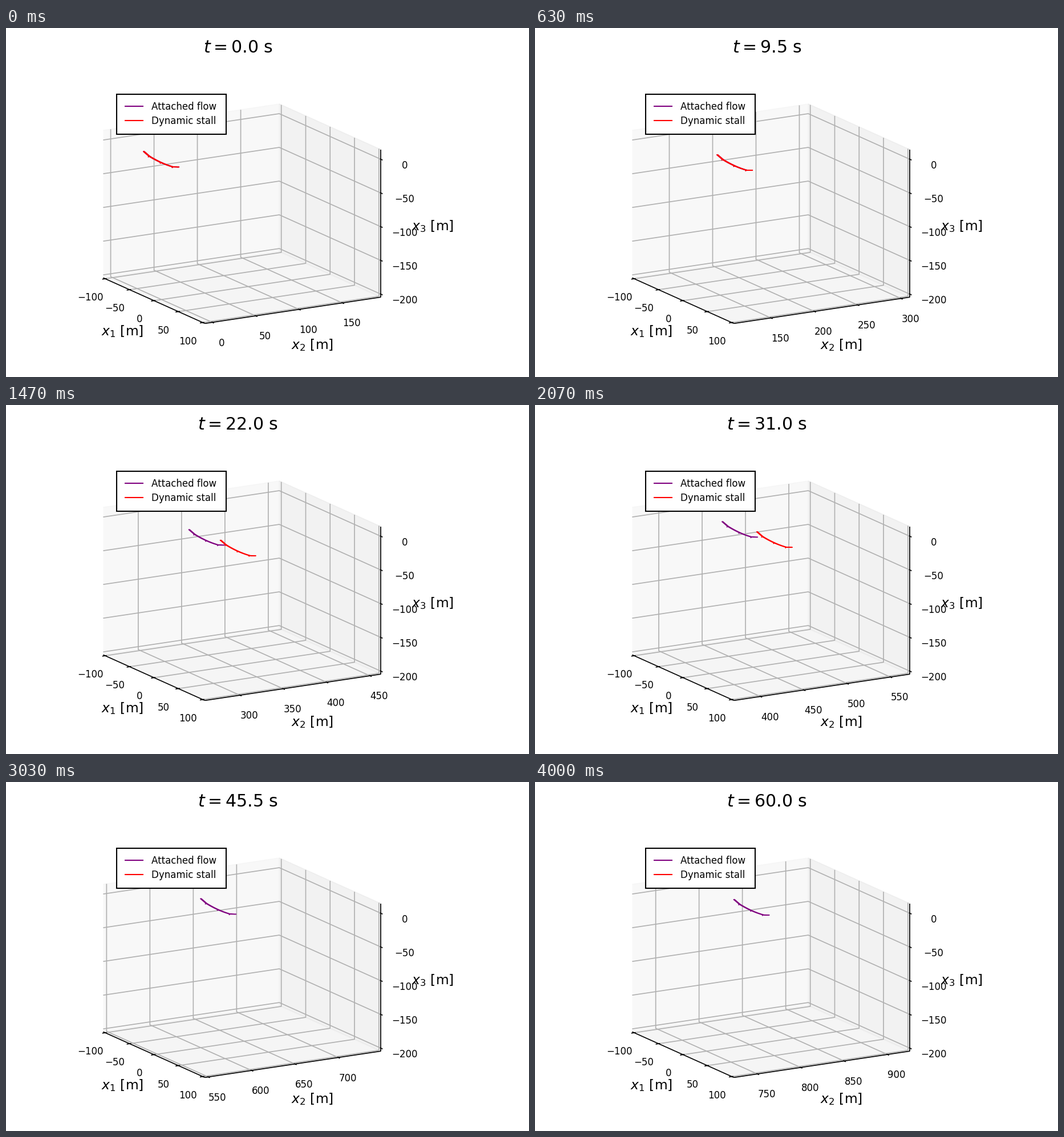
Animation, 917 px wide and 611 px high, one loop 4030 ms. Source, as a matplotlib script:

```python
import numpy as np
import matplotlib.pyplot as plt
from matplotlib.animation import FuncAnimation
from matplotlib.collections import LineCollection
from matplotlib.patches import Polygon, Rectangle

W, H, DPI = 917, 611, 72          # at 72 dpi one point is one pixel
TICK_MS, LOOP = 10, 4030          # the screen refreshes on 10 ms ticks
STATES, STEP, STATE_MS = 121, 0.5, 100 / 3
SPEED, START = 12.192, -8.65      # motion of the x2 window, m/s and m

plt.rcParams["font.family"] = "DejaVu Sans"
plt.rcParams["mathtext.fontset"] = "dejavusans"

# Orthographic view of a 4:4:3 box
ELEV, AZIM, SCALE = np.radians(15), np.radians(30), 356.5
X1 = (-100 - 25 / 6, 100 + 25 / 6)
X2 = (0, 203.125)                 # measured from the window's lower edge
X3 = (-204.375, 14.375)


def project(x1, x2, x3):
    a = (x1 - X1[0]) / (X1[1] - X1[0])
    b = (x2 - X2[0]) / (X2[1] - X2[0])
    c = (x3 - X3[0]) / (X3[1] - X3[0])
    x = 170.4 + SCALE * (np.sin(AZIM) * a + np.cos(AZIM) * b)
    depth = np.cos(AZIM) * a - np.sin(AZIM) * b
    y = 437.4 + SCALE * (np.sin(ELEV) * depth - 0.75 * np.cos(ELEV) * c)
    return x, y


def path(*points):
    return np.array([project(*p) for p in points])


def glide(t, knots, values):
    """Monotone cubic interpolation, at rest at the first knot."""
    k, v = np.array(knots, float), np.array(values, float)
    d = np.diff(v) / np.diff(k)
    m = np.zeros(len(k))
    for i in range(1, len(d)):
        if d[i - 1] * d[i] > 0:
            m[i] = 2 * d[i - 1] * d[i] / (d[i - 1] + d[i])
    m[-1] = d[-1]
    t = np.clip(t, k[0], k[-1])
    i = np.clip(np.searchsorted(k, t, side="right") - 1, 0, len(d) - 1)
    h = k[i + 1] - k[i]
    s = (t - k[i]) / h
    return (v[i] * (1 + 2 * s) * (1 - s) ** 2 + v[i + 1] * s * s * (3 - 2 * s)
            + h * m[i] * s * (1 - s) ** 2 - h * m[i + 1] * s * s * (1 - s))


# Flight paths: x2 inside the window and height of the wing centre
time = np.arange(STATES) * STEP
KNOTS = [0, 9.5, 22, 31, 36.5, 45.5, 60]
ahead = glide(time, KNOTS, [8.3, 59.6, 60.6, 65.5, 69.7, 74.1, 79])
height = glide(time, KNOTS, [-1.2, -15.9, -12.9, -2, -10, -3.7, -5.9])
STALL = [0, 9.5, 22, 31, 36.5, 40.5]
lead = glide(time, STALL, [0, 0, 36.3, 40, 111, 233])
drop = glide(time, STALL, [0, 0, -22.7, -22.8, -162.2, -219])

fig = plt.figure(figsize=(W / DPI, H / DPI), dpi=DPI, facecolor="white")
ax = fig.add_axes([0, 0, 1, 1])
ax.set_xlim(0, W)
ax.set_ylim(H, 0)
ax.axis("off")

LABEL = dict(fontsize=50 / 3, ha="center", va="baseline", zorder=4)
IN, OUT = 0.1 / 12, 0.2 / 12      # tick reach as a share of the box
D1, D2 = X1[1] - X1[0], X2[1] - X2[0]


def strokes(lines, color, zorder):
    group = LineCollection(lines, colors=color, linewidths=1.67, zorder=zorder)
    return ax.add_collection(group, autolim=False)


def number(v):
    return f"{v:d}".replace("-", "\u2212")


# Panes
for shade, corners in (
    (0.95, [(X1[0], X2[0], X3[0]), (X1[0], X2[1], X3[0]),
            (X1[0], X2[1], X3[1]), (X1[0], X2[0], X3[1])]),
    (0.90, [(X1[0], X2[1], X3[0]), (X1[1], X2[1], X3[0]),
            (X1[1], X2[1], X3[1]), (X1[0], X2[1], X3[1])]),
    (0.925, [(X1[0], X2[0], X3[0]), (X1[1], X2[0], X3[0]),
             (X1[1], X2[1], X3[0]), (X1[0], X2[1], X3[0])]),
):
    tone = (shade, shade, shade, 0.5)
    ax.add_patch(Polygon(path(*corners), closed=False, fc=tone, ec=tone,
                         lw=1.67, zorder=1))

# Fixed grid, ticks and numbers
grid, marks = [], []
for v in range(-100, 101, 50):
    grid.append(path((v, X2[0], X3[0]), (v, X2[1], X3[0]), (v, X2[1], X3[1])))
    marks.append(path((v, -OUT * D2, X3[0]), (v, IN * D2, X3[0])))
    x, y = project(v, X2[0], X3[0])
    ax.text(x - 25.7, y + 38.1, number(v), **LABEL)
for v in range(-200, 1, 50):
    grid.append(path((X1[0], X2[0], v), (X1[0], X2[1], v), (X1[1], X2[1], v)))
    marks.append(path((X1[1] - IN * D1, X2[1], v), (X1[1] + OUT * D1, X2[1], v)))
    x, y = project(X1[1], X2[1], v)
    ax.text(x + 41.3, y + 16.4, number(v), **LABEL)

# Axis lines and names
marks += [path((X1[0], X2[0], X3[0]), (X1[1], X2[0], X3[0])),
          path((X1[1], X2[0], X3[0]), (X1[1], X2[1], X3[0])),
          path((X1[1], X2[1], X3[0]), (X1[1], X2[1], X3[1]))]
strokes(grid, "#b0b0b0", 2)
strokes(marks, "black", 3)
for i, (x, y) in enumerate([(204, 538.4), (537, 562.3), (748, 354.4)], 1):
    ax.text(x, y, f"$x_{i}$ [m]", fontsize=70 / 3, ha="center", va="baseline")

title = ax.text(406.6, 43.1, "", fontsize=30, ha="center", va="baseline")

# Legend
ax.add_patch(Rectangle((193.5, 115.5), 192, 70, fc="white", ec="black", lw=2.08, zorder=8))
for y, color, name in ((136.5, "purple", "Attached flow"), (161.5, "red", "Dynamic stall")):
    ax.plot([207.7, 241], [y, y], color=color, lw=2.08, solid_capstyle="butt", zorder=9)
    ax.text(254.6, y + 6.4, name, fontsize=50 / 3, va="baseline", zorder=9)


class Scale:
    """The x2 grid lines, ticks and numbers that slide past the wings."""

    def __init__(self):
        self.grid = strokes([], "#b0b0b0", 2)
        self.marks = strokes([], "black", 3)
        self.texts = [ax.text(0, 0, "", **LABEL) for _ in range(4)]

    def place(self, low):
        first = int(np.ceil((low + 3.7) / 50)) * 50
        values = range(first, int(np.floor(low + 198.6)) + 1, 50)
        spots = [v - low for v in values]
        self.grid.set_segments([path((X1[0], u, X3[1]), (X1[0], u, X3[0]),
                                     (X1[1], u, X3[0])) for u in spots])
        self.marks.set_segments([path((X1[1] - IN * D1, u, X3[0]),
                                      (X1[1] + OUT * D1, u, X3[0])) for u in spots])
        for text in self.texts:
            text.set_text("")
        for text, u, v in zip(self.texts, spots, values):
            x, y = project(X1[1], u, X3[0])
            text.set_position((x + 16.3, y + 41.2))
            text.set_text(number(v))


class Wing:
    """Bent wing with raised outer panels and three pods."""
    BREAK, HALF, CHORD = 24.4, 35.65, 0.55

    def __init__(self, color, zorder):
        self.span = np.linspace(-self.HALF, self.HALF, 41)
        inner = np.minimum(abs(self.span), self.BREAK)
        self.rise = 1.5 * (inner / self.BREAK) ** 2 + 0.3 * (abs(self.span) - inner)
        self.body = Polygon([(0, 0)] * 3, fc=color, ec=color, lw=1.5,
                            joinstyle="round", zorder=zorder)
        ax.add_patch(self.body)
        self.pods = strokes([], color, zorder)
        for part in (self.body, self.pods):
            part.set_clip_path(window)

    def place(self, u, z):
        front = project(self.span, u + self.CHORD, z + self.rise)
        back = project(self.span, u - self.CHORD, z + self.rise)
        self.body.set_xy(np.vstack([np.transpose(front), np.transpose(back)[::-1]]))
        self.pods.set_segments([
            path((x1, u, z + rise), (x1, u - 1.5, z + rise - 1))
            for x1, rise in ((-self.BREAK, 1.5), (0, 0), (self.BREAK, 1.5))])


window = Rectangle((129.5, 55.5), 554, 554, transform=ax.transData)
scale = Scale()
attached, stalled = Wing("purple", 5), Wing("red", 6)


def draw(tick):
    i = int((tick + 0.5) * TICK_MS / STATE_MS)
    scale.place(START + SPEED * time[i])
    attached.place(ahead[i], height[i])
    stalled.place(ahead[i] + lead[i], height[i] + drop[i])
    title.set_text(f"$t = {time[i]:.1f}$ s")
    return []


anim = FuncAnimation(fig, draw, frames=LOOP // TICK_MS, init_func=lambda: draw(0),
                     interval=TICK_MS, repeat=True, repeat_delay=0)
plt.show()
```
